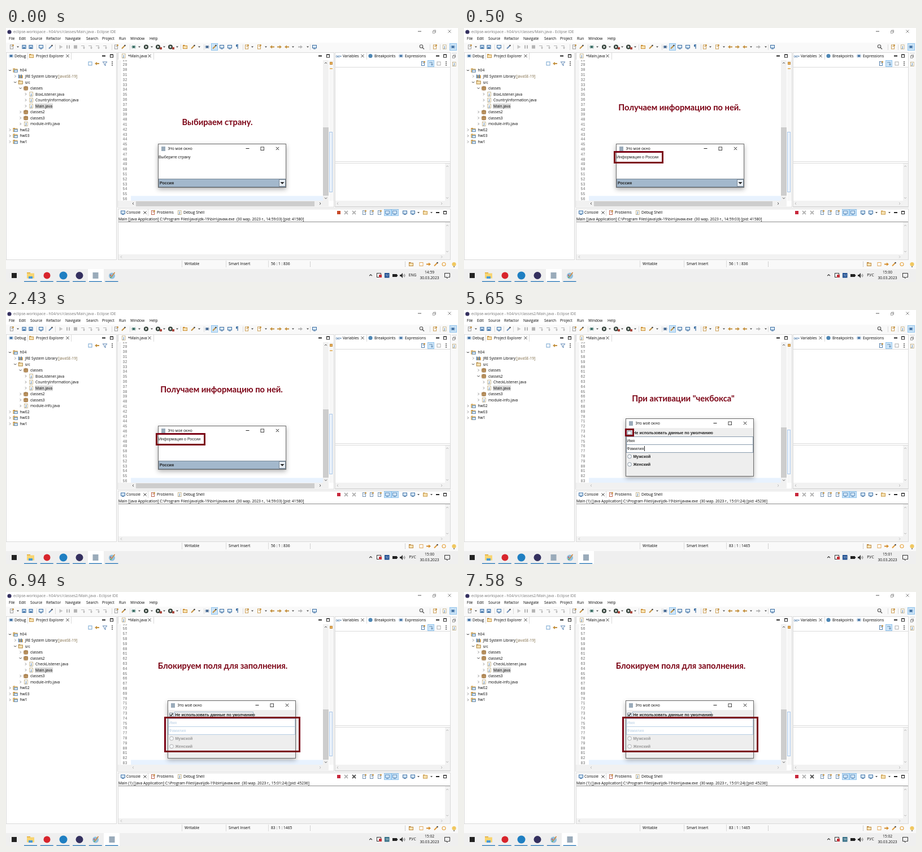
Recreate the animation shown at these times as an HTML page with a canvas. Size 800 by 450 pixels, loop 8 s.

```html
<!DOCTYPE html>
<html lang="ru">
<head>
<meta charset="utf-8">
<title>Eclipse IDE</title>
<style>
html, body { margin: 0; width: 100%; height: 100%; overflow: hidden; background: #fff }
canvas { display: block }
</style>
</head>
<body>
<canvas id="stage" width="800" height="450"></canvas>
<script>
const g = document.getElementById('stage').getContext('2d');
const UI = '"Open Sans", "Noto Sans", sans-serif';
const SWING = '"Liberation Sans", Arial, sans-serif';
const MAROON = '#7c0416', LINE = '#dadada', CHROME = '#f9f9f9';
const BLUE = '#3f70a3', GOLD = '#c4913f', GRAY = '#b4b4b4', DARK = '#444';

function text(s, x, y, color = '#050505', font = `6.7px ${UI}`, align = 'left') {
  g.font = font;
  g.fillStyle = color;
  g.textAlign = align;
  g.fillText(s, x, y + 2.4);
}
const swing = (s, x, y, color = '#222', bold = '') => text(s, x, y, color, `${bold} 7.05px ${SWING}`);

function rect(x, y, w, h, fill, stroke, lw = 1) {
  if (fill) { g.fillStyle = fill; g.fillRect(x, y, w, h); }
  if (stroke) {
    g.strokeStyle = stroke;
    g.lineWidth = lw;
    g.strokeRect(x + lw / 2, y + lw / 2, w - lw, h - lw);
  }
}
function path(color, lw, ...p) {
  g.strokeStyle = color;
  g.lineWidth = lw;
  g.beginPath();
  for (let i = 0; i < p.length; i += 2) g.lineTo(p[i], p[i + 1]);
  g.stroke();
}
function poly(color, ...p) {
  g.fillStyle = color;
  g.beginPath();
  for (let i = 0; i < p.length; i += 2) g.lineTo(p[i], p[i + 1]);
  g.fill();
}
function circle(x, y, r, fill, stroke, lw = .8) {
  g.beginPath();
  g.arc(x, y, r, 0, 7);
  if (fill) { g.fillStyle = fill; g.fill(); }
  if (stroke) { g.strokeStyle = stroke; g.lineWidth = lw; g.stroke(); }
}
const hline = (x, y, w, c = LINE) => rect(x, y, w, 1, c);
const vline = (x, y, h, c = LINE) => rect(x, y, 1, h, c);

// Small symbols centred on x, y
const icons = {
  square: (x, y, c) => rect(x - 3, y - 3, 6, 6, c),
  dot: (x, y, c) => circle(x, y, 3.6, c),
  ring: (x, y, c) => circle(x, y, 3, null, c, 1.1),
  box: (x, y, c) => rect(x - 3.5, y - 3.5, 7, 7, '#fff', c),
  cross: (x, y, c) => { path(c, 1, x - 2.6, y - 2.6, x + 2.6, y + 2.6); path(c, 1, x + 2.6, y - 2.6, x - 2.6, y + 2.6); },
  heavy: (x, y, c) => { path(c, 1.8, x - 3, y - 3, x + 3, y + 3); path(c, 1.8, x + 3, y - 3, x - 3, y + 3); },
  caret: (x, y, c) => poly(c, x - 2, y - 1, x + 2, y - 1, x, y + 1.3),
  play: (x, y, c) => poly(c, x - 2.5, y - 3.5, x + 3.5, y, x - 2.5, y + 3.5),
  run: (x, y, c) => { circle(x, y, 4, c); poly('#fff', x - 1.2, y - 2.2, x + 2.3, y, x - 1.2, y + 2.2); },
  pause: (x, y, c) => { rect(x - 3, y - 3, 2, 6, c); rect(x + 1, y - 3, 2, 6, c); },
  dots: (x, y, c) => { for (const d of [-3, 0, 3]) circle(x, y + d, 1, c); },
  slash: (x, y, c) => { path(c, 2, x - 3, y + 3, x + 2, y - 2); circle(x + 2.5, y - 2.5, 1.3, DARK); },
  step: (x, y, c) => { path(c, 1.1, x - 3, y - 2, x + 2, y - 2, x + 2, y + 2); poly(c, x, y + 1, x + 4, y + 1, x + 2, y + 4); },
  left: (x, y, c) => { path(c, 2, x - 1, y, x + 4, y); poly(c, x - 4, y, x, y - 3, x, y + 3); },
  right: (x, y, c) => { path(c, 2, x - 4, y, x + 1, y); poly(c, x + 4, y, x, y - 3, x, y + 3); },
  bug: (x, y, c) => { path(c, .9, x - 3, y - 3, x + 3, y + 3); path(c, .9, x + 3, y - 3, x - 3, y + 3); path(c, .9, x - 4, y, x + 4, y); circle(x, y, 2.3, c); },
  save: (x, y, c) => { rect(x - 3.5, y - 3.5, 7, 7, '#b9d3ec', c); rect(x - 1.5, y + .5, 3, 3, c); },
  screen: (x, y, c) => { rect(x - 4, y - 3.5, 8, 6, '#d7e8f7', c); hline(x - 2, y + 3, 4, c); },
  folder: (x, y, c) => { rect(x - 4, y - 3.5, 3.5, 2, c); rect(x - 4, y - 2.5, 8, 6, '#f7e3b4', c, .9); },
  project: (x, y) => { icons.folder(x, y, GOLD); rect(x - 2.5, y - 1, 7, 4.5, '#dcebf6', BLUE, .8); },
  pack: (x, y, c) => { rect(x - 3.5, y - 3, 7, 6.5, '#efd3a6', c); path(c, 1, x, y - 4, x, y + 4); path(c, 1, x - 4, y, x + 4, y); },
  java: (x, y) => { rect(x - 3, y - 4, 6.5, 8, '#fff', '#b7a374', .8); text('J', x + .3, y, BLUE, `bold 6px ${UI}`, 'center'); },
  page: (x, y, c) => { rect(x - 3, y - 4, 6, 8, '#fff', c, .9); path(c, .8, x - 1, y - 1, x + 2, y - 1); circle(x + 2.5, y - 3, 1.5, GOLD); },
  min: (x, y, c) => rect(x - 3, y - 1, 6, 2, c),
  max: (x, y, c) => { rect(x - 3, y - 3, 6, 6, null, c); hline(x - 3, y - 2.5, 6, c); },
  restore: (x, y, c) => { rect(x - 1.5, y - 2.5, 4.5, 4.5, null, c, .8); rect(x - 3, y - 1, 4.5, 4.5, '#fff', c, .8); },
  find: (x, y, c) => { circle(x - 1, y - 1, 2.7, null, c, 1.1); path(c, 1.2, x + 1, y + 1, x + 4, y + 4); }
};
const chevron = (x, y, dx, dy, c = '#555', lw = 1) =>
  path(c, lw, x - dx - dy * 2, y - dy - dx * 2, x + dx, y + dy, x - dx + dy * 2, y - dy + dx * 2);
function row(y, list) {
  for (const [name, color, ...xs] of list) for (const x of xs) icons[name](x, y, color);
}

function header() {
  rect(0, 0, 800, 450, CHROME);
  rect(0, 0, 800, 26, '#fff');
  circle(6, 7, 3.6, '#34305f');
  row(6, [['min', '#aaa', 732], ['restore', '#888', 758], ['cross', '#888', 785]]);
  const menu = { File: 5, Edit: 23, Source: 43, Refactor: 71, Navigate: 105, Search: 142, Project: 170, Run: 200, Window: 220, Help: 254 };
  for (const name in menu) text(name, menu[name], 19);
  for (const x of [54, 70, 87, 187, 219, 309, 350, 419, 538, 750, 768]) vline(x, 29, 10);
  rect(363, 27, 12, 13, '#cce4f7', '#90c4ee');
  rect(785, 27, 13, 13, '#cce4f7', '#90c4ee');
  row(33.5, [
    ['page', '#8e8e8e', 10, 195], ['caret', DARK, 21, 236, 258, 280, 303, 342, 436, 460, 508, 534],
    ['save', BLUE, 32, 44], ['screen', BLUE, 62, 382, 396, 546], ['slash', '#6c8db5', 79],
    ['play', '#c5c5c5', 97], ['pause', GRAY, 110], ['square', GRAY, 123], ['step', GRAY, 136, 149, 162, 175],
    ['slash', GOLD, 208, 331, 369], ['bug', '#376c64', 226], ['run', '#36443c', 248, 269, 291],
    ['folder', '#c98a2b', 317], ['bug', '#426690', 356], ['page', GOLD, 426, 448],
    ['left', GOLD, 471, 497], ['right', GOLD, 484], ['right', GRAY, 521],
    ['find', '#555', 736], ['page', GOLD, 759], ['java', '', 776], ['bug', BLUE, 791]
  ]);
  for (const x of [272, 294]) rect(x, 34, 4, 4, '#a9473d');
  text('¶', 409, 33.5, BLUE, `bold 8px ${UI}`, 'center');
}

function tab(x, w, y = 43) {
  path(LINE, 1, x + .5, y + 13, x + .5, y + .5, x + w - .5, y + .5, x + w - .5, y + 13);
}

function explorer(second) {
  rect(0, 43, 196, 368, '#fff', LINE);
  tab(38, 78);
  row(49.5, [['bug', BLUE, 9], ['folder', GOLD, 45], ['cross', DARK, 109], ['min', '#222', 173], ['max', '#222', 187]]);
  text('Debug', 15, 49.5);
  text('Project Explorer', 53, 49.5);
  row(63, [['box', '#72a3d0', 149], ['left', GOLD, 161], ['dots', '#555', 188]]);
  path('#5a83b2', 1, 171, 60, 179, 60, 176, 63, 176, 67, 174, 65, 174, 63, 171, 60);

  // Depth, state (+ closed, - open), icon, label
  const files = names => names.map(n => [3, '+', 'java', n]);
  const rows = [
    [0, '-', 'project', 'h04'], [1, '+', 'lib', 'JRE System Library'], [1, '-', 'folder', 'src'],
    [2, second ? '+' : '-', 'pack', 'classes'],
    ...(second ? [] : files(['BoxListener.java', 'CountryInformation.java', 'Main.java'])),
    [2, second ? '-' : '+', 'pack', 'classes2'],
    ...(second ? files(['CheckListener.java', 'Main.java']) : []),
    [2, '+', 'pack', 'classes3'], [2, '+', 'java', 'module-info.java'],
    [0, '+', 'project', 'hw02'], [0, '+', 'project', 'hw03'], [0, '+', 'project', 'hw1']
  ];
  rows.forEach(([depth, state, icon, label], i) => {
    const y = 75 + 10.55 * i, x = 9.3 * depth;
    if (state === '+') chevron(7 + x, y, 1, 0, '#888');
    else chevron(7 + x, y, 0, 1, '#333');
    if (label === 'Main.java') rect(51, y - 4.5, 32, 9.5, '#d9d9d9');
    if (icon === 'lib') [-3, -1, 1, 3].forEach((d, k) => rect(25 + d, y - 3 + k % 2, 1.7, 6.5 - k % 2, k % 2 ? GOLD : BLUE));
    else icons[icon](16.5 + x, y, icon === 'pack' ? '#8a5a24' : '#a9803f');
    text(label, 24.5 + 9.2 * depth, y);
    if (icon === 'lib') text('[JavaSE-19]', 91.5, y, '#7a6640');
  });
}

function editor(second) {
  rect(197, 43, 384, 275, '#fff', LINE);
  rect(199, 57, 5, 249, '#f6f6f6');
  const first = second ? 55 : 28;
  rect(221, 297.5, 340, 8.5, '#e8f2fe');
  for (let i = 0; i <= 28; i++)
    text(first + i, 214.5, 56.2 + 8.8 * i, '#6c6c6c', '6.6px "Liberation Mono", monospace', 'right');
  rect(198, 44, 382, 13, '#fff');
  tab(198, 64);
  row(49.5, [['java', '', 208], ['cross', DARK, 254], ['min', '#222', 556], ['max', '#222', 570]]);
  text('*Main.java', 216, 49.5);

  rect(561, 57, 10, 249, '#f1f1f1');
  const top = second ? 208 : 176;
  rect(561, top, 10, 297 - top, '#cdcdcd');
  chevron(566, 62, 0, -1);
  chevron(566, 301.5, 0, 1);
  rect(572, 57, 8, 249, '#f7f7f7');
  rect(573, 60, 5, 5, '#e8b05c', '#c28a3a');
  if (!second) rect(573, 71, 5, 2, '#e7bb70');
  rect(572, second ? 212 : 184, 6, second ? 79 : 107, '#edf4fc', '#a9c6e8');
  rect(198, 306, 373, 10, '#f1f1f1');
  if (!second) rect(230, 307, 316, 9, '#cdcdcd');
  const c = second ? '#bbb' : '#555';
  chevron(225, 311, -1, 0, c);
  chevron(556, 311, 1, 0, c);
}

function variables() {
  rect(582, 43, 205, 275, '#fff', LINE);
  tab(582, 57);
  row(49.5, [['cross', DARK, 631], ['dot', '#4d86b4', 645], ['bug', '#4b79a8', 699], ['min', '#222', 764], ['max', '#222', 777]]);
  text('(x)=', 584, 49.5, BLUE, `bold 5.3px ${UI}`);
  text('Variables', 596, 49.5);
  text('Breakpoints', 652, 49.5);
  text('Expressions', 706, 49.5);
  rect(746, 57, 12, 12, '#cce4f7', '#90c4ee');
  row(63, [['page', BLUE, 738], ['step', '#6a8fb5', 752], ['box', '#aaa', 766], ['dots', '#555', 779]]);
  rect(582, 69, 205, 168, '#fff', LINE);
  rect(582, 239, 205, 78, '#fff', LINE);
  rect(777, 240, 9, 66, '#f2f2f2');
  rect(583, 306, 203, 10, '#f2f2f2');
  chevron(781, 245, 0, -1, '#bbb');
  chevron(781, 301, 0, 1, '#bbb');
  chevron(587, 311, -1, 0, '#bbb');
  chevron(771, 311, 1, 0, '#bbb');
  // Minimised view strip
  hline(789, 44, 9);
  row(50, [['restore', '#777', 793]]);
  row(64, [['java', '', 793]]);
}

function consoleView(scene) {
  rect(198, 320, 589, 91, '#fff', LINE);
  tab(198, 54, 320);
  rect(669, 321, 13, 12, '#cce4f7', '#90c4ee');
  rect(682, 321, 13, 12, '#cce4f7', '#90c4ee');
  row(327, [
    ['screen', BLUE, 207], ['cross', DARK, 246], ['page', '#b5543e', 260], ['java', '', 307],
    ['square', scene ? '#c8283c' : '#c84a28', 589], ['heavy', GRAY, 602], ['heavy', scene === 3 ? '#555' : GRAY, 616],
    ['page', '#6688aa', 634, 647, 661], ['screen', '#5d8fc0', 675, 688], ['screen', BLUE, 706, 720],
    ['caret', DARK, 730, 753], ['folder', GOLD, 742], ['min', '#222', 764], ['max', '#222', 777]
  ]);
  text('Console', 213, 327);
  text('Problems', 267, 327);
  text('Debug Shell', 314, 327);
  const [name, time, pid] = scene > 1 ? ['Main (1)', '15:01:24', 45236] : ['Main', '14:59:03', 41580];
  text(`${name} [Java Application] C:\\Program Files\\Java\\jdk-19\\bin\\javaw.exe  (30 мар. 2023 г., ${time}) [pid: ${pid}]`, 199, 338.7);
  hline(199, 343, 587, '#8c8c8c');
  rect(777, 344, 9, 57, '#f2f2f2');
  rect(199, 401, 587, 9, '#f2f2f2');
  chevron(781, 350, 0, -1, '#bbb');
  chevron(781, 396, 0, 1, '#bbb');
  chevron(204, 405.5, -1, 0, '#bbb');
  chevron(771, 405.5, 1, 0, '#bbb');
}

function statusBar(second) {
  for (const x of [311, 389, 464]) vline(x, 412, 12);
  text('Writable', 316, 418);
  text('Smart Insert', 394, 418);
  text(second ? '83 : 1 : 1465' : '56 : 1 : 836', 469, 418);
  for (const x of [538, 706]) for (let y = 414; y < 424; y += 2) rect(x, y, 1, 1, '#aaa');
  row(418.5, [['folder', '#b98238', 717], ['box', '#e0a75a', 735], ['right', '#d58d2c', 748],
    ['slash', '#e09a3a', 761], ['ring', '#e6a33e', 775], ['dot', '#f0c860', 793]]);
  rect(792, 422, 2, 2, '#888');
}

function taskbar(scene) {
  rect(0, 427, 800, 23, '#efefef');
  const active = [145, 145, 202, 173][scene];
  rect(active, 427, 28, 23, '#fff');
  rect(10, 434, 9, 9, '#222');
  const paint = x => { circle(x, 439, 5.5, '#8fc0df'); path('#d48a42', 1.7, x - 1, 441, x + 5, 433); circle(x - 2.5, 438, 1.2, '#c95450'); circle(x - 2, 441.5, 1.2, '#5fa35a'); };
  const cup = x => rect(x - 5, 433, 10, 11, '#9aabba');
  rect(37, 433, 6, 3, '#e2ab3a');
  rect(37, 434.5, 13, 9, '#f8d572');
  rect(40, 440, 7, 4, '#4a9bd6');
  circle(72.5, 438.5, 6, '#d8242c');
  circle(101.5, 438.5, 7, '#1f7fc2');
  circle(130, 438.5, 6.5, '#34305f');
  (scene === 3 ? paint : cup)(158.5);
  (scene === 3 ? cup : paint)(187.5);
  if (scene === 2) cup(216);
  for (let i = 0; i < (scene === 2 ? 7 : 6); i++) rect(32 + 28.7 * i, 448.5, 23, 1.5, '#3d83bd');
  chevron(645.5, 438, 0, -1.2, '#333', 1.2);
  rect(656, 434, 8, 8, '#fff', '#333');
  rect(660, 437, 5, 5, '#c6323a');
  rect(670, 434, 8.5, 8.5, scene === 3 ? '#356f86' : '#1f4f91');
  text(['32', '32', '33', '38'][scene], 674.2, 438, '#fff', `5px ${UI}`, 'center');
  rect(684, 436, 8, 5, '#222');
  rect(692, 437.5, 1.3, 2, '#222');
  poly('#333', 697, 437, 699, 437, 702, 434, 702, 443, 699, 440, 697, 440);
  for (const r of [2, 4]) { g.beginPath(); g.arc(702, 438.5, r, -.8, .8); g.strokeStyle = '#555'; g.lineWidth = .8; g.stroke(); }
  text(scene ? 'РУС' : 'ENG', 719.5, 438, '#111', undefined, 'center');
  text(['14:59', '15:00', '15:01', '15:02'][scene], 749.5, 432.8, '#111', undefined, 'center');
  text('30.03.2023', 749.5, 443, '#111', undefined, 'center');
  path('#333', 1, 776.5, 434.5, 785.5, 434.5, 785.5, 441.5, 782.5, 441.5, 780.5, 443.5, 780.5, 441.5, 776.5, 441.5, 776.5, 434);
}

function frameWindow(x, y, w, h, title, body) {
  g.save();
  g.shadowColor = 'rgba(0,0,0,.3)';
  g.shadowBlur = 8;
  g.shadowOffsetY = 3;
  rect(x, y, w, h, body);
  g.restore();
  rect(x, y, w, 17, '#fff');
  rect(x, y, w, h, null, '#6a6a6a');
  rect(x + 6, y + 5, 7, 8, '#9aabba');
  text(title, x + 17.5, y + 9);
  path('#222', 1, x + 155.5, y + 8.5, x + 161.5, y + 8.5);
  rect(x + 181.5, y + 5.5, 6.5, 6.5, null, '#333', .9);
  icons.cross(x + 211.5, y + 8.5, '#222');
}

function countryWindow(message) {
  frameWindow(269, 205, 227, 78, 'Это мое окно', '#fff');
  swing(message, 270, 228.8);
  rect(270, 267, 225, 15, '#a3b8cc', '#7a8a99');
  rect(483, 268, 12, 13, '#e9eff5', '#7a8a99');
  poly('#222', 485.5, 273, 492.5, 273, 489, 276.7);
  swing('Россия', 272, 274.5, '#222', 'bold');
}

function formWindow(locked) {
  frameWindow(286, 192, 227, 103, 'Это моё окно', '#eee');
  rect(289, 214, 7.5, 7.5, '#f6f9fc', '#7a8a99');
  if (locked) {
    path('#222', 1.3, 290.5, 217, 292, 219.5, 295, 215.5);
    rect(298, 212, 140, 10.5, null, '#a3b8cc');
  }
  swing('Не использовать данные по умолчанию', 299.5, 217.5, '#222', 'bold');
  ['Имя', 'Фамилия'].forEach((s, i) => {
    rect(287, 224 + 14 * i, 225, 15, '#fff', locked ? '#b8cfe5' : '#8a9cae');
    swing(s, 288.3, 231.5 + 14 * i, locked ? '#b8cfe5' : '#222');
  });
  if (!locked) vline(319, 241, 9, '#222');
  ['Мужской', 'Женский'].forEach((s, i) => {
    circle(293, 259.5 + 14 * i, 3.4, '#f4f7fa', locked ? '#a5a5a5' : '#7a8a99');
    swing(s, 299.5, 260 + 14 * i, locked ? '#999' : '#222', 'bold');
  });
}

const captions = [
  ['Выбираем страну.', 374, 169.5],
  ['Получаем информацию по ней.', 381.5, 144],
  ['При активации "чекбокса"', 388, 160],
  ['Блокируем поля для заполнения.', 383.5, 134]
];

function draw(scene) {
  const second = scene > 1;
  header();
  text(`eclipse-workspace - h04/src/classes${second ? 2 : ''}/Main.java - Eclipse IDE`, 13, 6.5, '#777');
  explorer(second);
  editor(second);
  variables();
  consoleView(scene);
  statusBar(second);
  taskbar(scene);
  if (second) formWindow(scene === 3);
  else countryWindow(scene ? 'Информация о России' : 'Выберите страну');
  if (scene === 1) rect(265, 218, 88, 22, null, MAROON, 3);
  if (scene === 2) rect(285, 210, 16, 14, null, MAROON, 3);
  if (scene === 3) rect(280, 221, 241, 63, null, MAROON, 3);
  const [caption, x, y] = captions[scene];
  text(caption, x, y, MAROON, `bold 14.7px Lato, Carlito, ${UI}`, 'center');
}

const starts = [0, 500, 3720, 6940];
let shown = -1;
function tick() {
  const t = performance.now() % 8000;
  const scene = starts.filter(s => s <= t).length - 1;
  if (scene !== shown) draw(shown = scene);
  requestAnimationFrame(tick);
}
tick();
</script>
</body>
</html>
```
